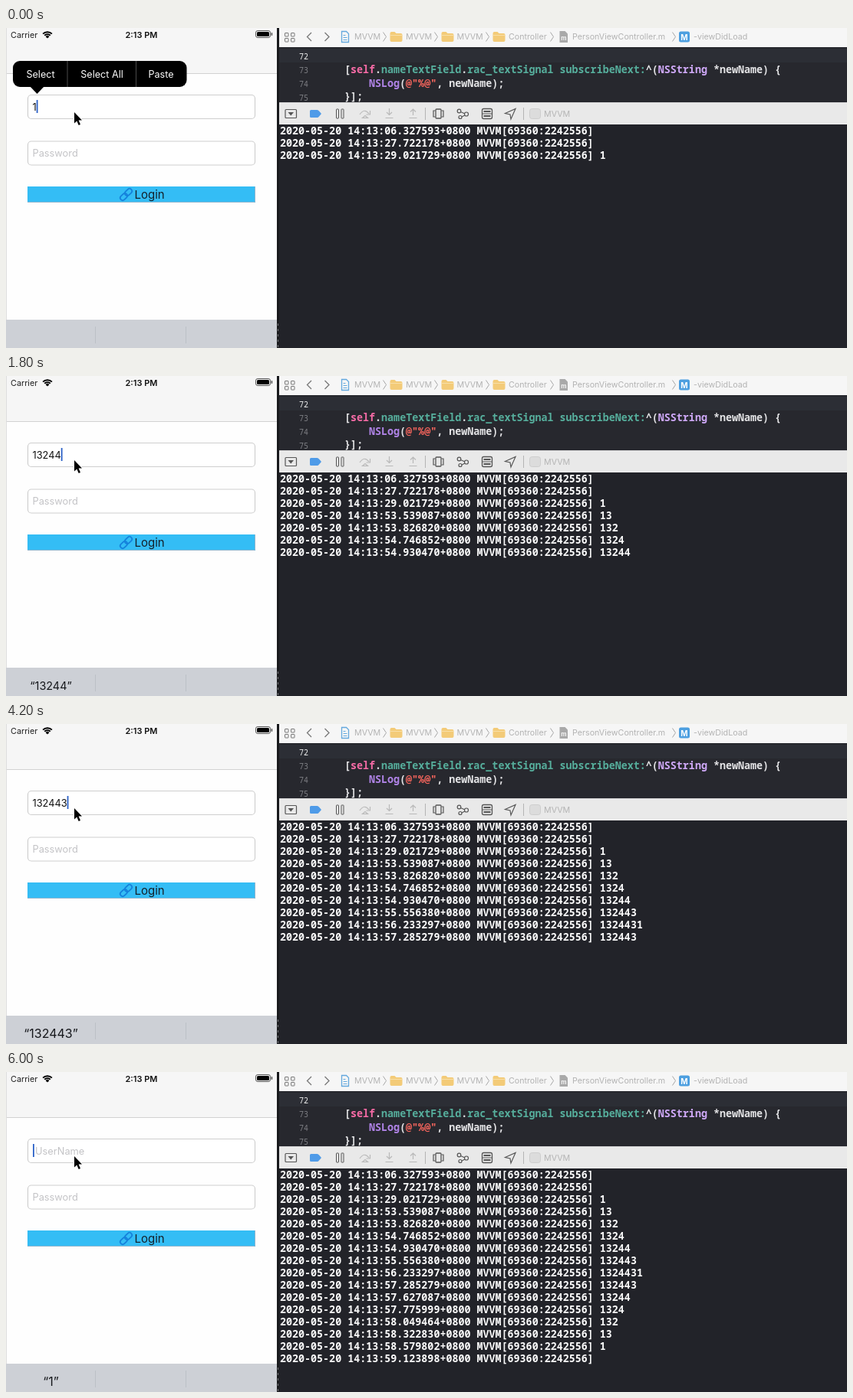
Animation, 1096 px wide and 418 px high, one loop 6200 ms. Source, as an HTML page with a canvas:

```html
<!DOCTYPE html>
<html lang="en">
<head>
<meta charset="utf-8">
<title>Login field logging</title>
<style>
html, body { margin: 0; width: 100%; height: 100%; overflow: hidden; background: #222329; }
canvas { display: block; }
</style>
</head>
<body>
<canvas id="stage" width="1096" height="418"></canvas>
<script>
const ctx = document.getElementById('stage').getContext('2d');
const LOOP = 6200, STEP = 200, START = 53190;
const UI = 'Inter, "Open Sans", sans-serif';
const MONO = '"Noto Sans Mono", "DejaVu Sans Mono", monospace';
const CODE = '13.37px ' + MONO;

// seconds and logged value
const log = `06.327593
27.722178
29.021729 1
53.539087 13
53.826820 132
54.746852 1324
54.930470 13244
55.556380 132443
56.233297 1324431
57.285279 132443
57.627087 13244
57.775999 1324
58.049464 132
58.322830 13
58.579802 1
59.123898`.split('\n').map(row => {
  const [sec, value = ''] = row.split(' ');
  return { sec, value, at: sec * 1000 - START };
});

function rect(x, y, w, h, color) {
  ctx.fillStyle = color;
  ctx.fillRect(x, y, w, h);
}

function round(x, y, w, h, r, fill, stroke, width = 1) {
  ctx.beginPath();
  ctx.roundRect(x, y, w, h, r);
  if (fill) { ctx.fillStyle = fill; ctx.fill(); }
  if (stroke) { ctx.strokeStyle = stroke; ctx.lineWidth = width; ctx.stroke(); }
}

function text(str, x, y, font, color, align = 'left') {
  ctx.font = font;
  ctx.textAlign = align;
  ctx.fillStyle = color;
  ctx.fillText(str, x, y);
  return ctx.measureText(str).width;
}

const ui = (str, x, y, size, color, align, weight = 400) =>
  text(str, x, y, `${weight} ${size}px ${UI}`, color, align);

function line(d, color, width = 1) {
  ctx.strokeStyle = color;
  ctx.lineWidth = width;
  ctx.stroke(new Path2D(d));
}

function shape(d, color) {
  ctx.fillStyle = color;
  ctx.fill(new Path2D(d));
}

function ring(x, y, r, color, width = 1) {
  ctx.beginPath();
  ctx.arc(x, y, r, 0, Math.PI * 2);
  ctx.strokeStyle = color;
  ctx.lineWidth = width;
  ctx.stroke();
}

function statusBar() {
  ui('Carrier', 6, 13, 10.8, '#222');
  ctx.lineCap = 'butt';
  for (const r of [3, 6, 9]) {
    ctx.beginPath();
    ctx.arc(54, 13.5, r - 0.7, -Math.PI * 0.75, -Math.PI * 0.25);
    ctx.strokeStyle = '#000';
    ctx.lineWidth = 2;
    ctx.stroke();
  }
  shape('M54 13.5 L52 11.4 Q54 9.8 56 11.4 Z', '#000');
  ui('2:13 PM', 176.5, 13, 11, '#111', 'center', 600);
  round(325.5, 3.5, 19, 9, 2.6, null, '#555');
  round(327, 5, 16, 6, 1.5, '#000');
  round(345.6, 6, 1.6, 4, 0.8, '#555');
}

function linkIcon() {
  ctx.save();
  ctx.translate(156.5, 217.5);
  ctx.rotate(-Math.PI / 4);
  round(-9.5, -3.2, 10.5, 6.4, 3.2, null, '#1582dc', 1.8);
  round(-1, -3.2, 10.5, 6.4, 3.2, null, '#1582dc', 1.8);
  ctx.restore();
}

function phone() {
  rect(0, 0, 353, 418, '#fefefe');
  rect(0, 0, 353, 59, '#f6f6f6');
  rect(0, 59, 353, 1, '#d2d2d2');
  rect(0, 0, 1, 381, '#dedede');
  statusBar();
  for (const y of [87.5, 148]) round(28.5, y, 296, 31, 4.5, '#fff', '#cfcfcf', 1.2);
  ui('Password', 34.5, 167.5, 12.8, '#c3c3c6');
  rect(28, 207, 297, 21, '#34bdf5');
  line('M28 227.5 H324.5 V207', '#8fb6cf');
  linkIcon();
  ui('Login', 167.5, 223, 15, '#14202a');
  rect(0, 381, 353, 37, '#cdd0d6');
  for (const x of [116, 234]) rect(x, 390, 1, 22, '#bcc0c6');
}

function caretAlpha(age) {
  const p = age % 1000;
  if (p < 500) return 1;
  if (p < 600) return (600 - p) / 100;
  return p < 850 ? 0 : (p - 850) / 150;
}

function nameField(entry, age) {
  let x = 36;
  if (entry.value) x = 35.5 + ui(entry.value, 34.5, 107.5, 12.8, '#111');
  else ui('UserName', 38, 107.5, 12.8, '#c3c3c6');
  ctx.globalAlpha = caretAlpha(age);
  rect(x - 1, 94, 1.8, 17, '#2c62c8');
  ctx.globalAlpha = 1;
}

function suggestion(i, t) {
  while (t - log[i].at < 12 || !log[i].value) i--;
  if (i < 3) return;
  const { value, at } = log[i];
  const fresh = t - at < 250;
  const grows = value.length > log[i - 1].value.length;
  const size = fresh && grows ? 14.4 : 16;
  const gap = t - at < 50 && !grows ? ' ' : '';
  ui(`“${value}${gap}”`, 58.5, 410, size, '#16181c', 'center');
}

function menu() {
  round(9, 43, 226.5, 34, 9, '#000');
  shape('M31 76 H50 L40.5 86 Z', '#000');
  for (const x of [79.5, 169]) rect(x, 43, 1, 34, '#4a4a4a');
  ui('Select', 45, 65, 12.6, '#fff', 'center');
  ui('Select All', 125, 65, 12.6, '#fff', 'center');
  ui('Paste', 202, 65, 12.6, '#fff', 'center');
}

function pointer() {
  const d = 'M89 110 V124.5 L92.3 121.5 L94.7 127 L97 126 L94.6 120.6 H99 Z';
  line(d, '#fff', 2);
  shape(d, '#000');
}

function folder(x) {
  shape(`M${x} 7 q0 -2 2 -2 h4 l2 2 h6 q2 0 2 2 v7 q0 2 -2 2 h-12 q-2 0 -2 -2 Z`, '#f3cb78');
  rect(x, 9, 16, 1, '#f8dfa8');
}

function pathBar() {
  rect(356, 0, 740, 25, '#f6f6f6');
  for (const [x, y] of [[363, 6], [371, 6], [363, 13], [371, 13]])
    round(x + 0.5, y + 0.5, 4.5, 4.5, 0.5, null, '#777');
  line('M398 6 l-5.5 5.5 l5.5 5.5 M415.5 6 l5.5 5.5 l-5.5 5.5', '#777', 1.3);
  line('M437.5 4.5 h6 l3 3 v11 h-9 Z', '#63a8dd', 1.3);
  line('M439.5 15.5 h5 M439.5 12.5 h5 M439.5 9.5 h3', '#63a8dd');
  for (const x of [500.5, 567.5, 634.5]) folder(x);
  shape('M721.5 4 h7 l3.5 3.5 v11.5 h-10.5 Z', '#a9a9a9');
  ui('m', 726.8, 16, 8, '#f6f6f6', 'center', 700);
  round(877, 4.5, 14, 14, 2.5, '#4d9fe0');
  ui('M', 884, 15.5, 10, '#fff', 'center', 700);
  const labels = [['MVVM', 454], ['MVVM', 521], ['MVVM', 587.5], ['Controller', 655],
    ['PersonViewController.m', 738], ['-viewDidLoad', 896]];
  for (const [str, x] of labels) ui(str, x, 15, 10.7, '#b3b3b3');
  for (const x of [491.5, 558.5, 625.5, 709.5, 868.5])
    line(`M${x} 5.5 l4 6 l-4 6`, '#a6a6a6');
}

function codeLine(x, y, parts) {
  for (const [str, color] of parts) x += text(str, x, y, '600 ' + CODE, color);
}

function editor() {
  const plain = '#e4e4e6', teal = '#56ae9c', violet = '#b184e8', lilac = '#cfa9f8';
  rect(356, 25, 740, 72, '#27282e');
  rect(356, 27, 740, 18, '#2c2e35');
  for (let n = 72; n < 76; n++)
    text(n, 394, 40.5 + (n - 72) * 18, '10px ' + MONO, n === 72 ? '#ededed' : '#7d7e83', 'right');
  codeLine(441, 58.5, [['[', plain], ['self', '#f76ba6'], ['.', plain],
    ['nameTextField', teal], ['.', plain], ['rac_textSignal subscribeNext:', teal],
    ['^(', plain], ['NSString', lilac], [' *newName) {', plain]]);
  codeLine(473, 76.5, [['NSLog', violet], ['(', plain], ['@"%@"', '#f2645c'],
    [', newName);', plain]]);
  codeLine(441, 94, [['}];', plain]]);
}

function toolbar() {
  const dark = '#555', pale = '#b9b9b9';
  rect(356, 97, 740, 29, '#e9e9e9');
  rect(356, 97, 740, 1, '#d6d6d6');
  round(364, 106.5, 14.5, 11, 1, null, dark, 1.2);
  shape('M367.5 110 h7.5 l-3.75 4.5 Z', dark);
  shape('M397.5 107 h8 q1.5 0 2.5 1.5 l3 3.5 l-3 3.5 q-1 1.5 -2.5 1.5 h-8 q-1.5 0 -1.5 -1.5 v-7 q0 -1.5 1.5 -1.5 Z', '#4f9be8');
  round(430.5, 106, 3, 12, 0.5, null, dark);
  round(437, 106, 3, 12, 0.5, null, dark);
  line('M461 113 q6 -9 12 -1 M474.5 108 v5 h-5 M464.5 117.5 l3.5 -3 l3.5 3 Z', pale, 1.2);
  line('M499.5 105 v8 M496 110 l3.5 3.5 l3.5 -3.5 M494.5 117.5 h10', pale, 1.2);
  line('M530.5 114 v-8 M527 109.5 l3.5 -3.5 l3.5 3.5 M525.5 117.5 h10', pale, 1.2);
  for (const x of [546, 674]) rect(x, 104, 1, 16, '#b4b4b4');
  round(560, 106, 7, 12, 1, null, dark, 1.3);
  line('M559.5 108 h-2.5 v8 h2.5 M567.5 108 h2.5 v8 h-2.5', dark, 1.2);
  ring(590.5, 108.5, 2.3, dark, 1.2);
  ring(600, 112.5, 2.5, dark, 1.2);
  ring(592, 116.5, 2, dark, 1.2);
  line('M592.5 109.5 l5 2.2 M594 116 l4 -2', dark, 1.2);
  round(620.5, 105.5, 13, 13, 2, null, dark, 1.3);
  line('M622.5 109 h9 M622.5 115 h9', dark, 2);
  line('M620.5 112 h13', dark);
  line('M650.5 111.5 L664 105.5 L658 119 L657 113 Z', dark, 1.2);
  round(682.5, 105.5, 14, 13, 3, '#dcdcdc', '#cdcdcd');
  ui('MVVM', 701, 116, 10.7, '#b4b4b4');
}

function consoleLog(last) {
  rect(356, 126, 740, 292, '#222329');
  for (let i = 0; i <= last; i++)
    text(`2020-05-20 14:13:${log[i].sec}+0800 MVVM[69360:2242556] ${log[i].value}`,
      357, 138.7 + i * 16, 'bold ' + CODE, '#fafafa');
}

function divider() {
  rect(353, 0, 3, 418, '#191a1d');
  for (let y = 386; y < 416; y += 7) rect(354, y, 1, 3, '#77797d');
}

function draw(now) {
  const t = Math.floor((now % LOOP) / STEP) * STEP;
  let last = log.length - 1;
  while (log[last].at > t) last--;
  phone();
  nameField(log[last], t - log[last].at);
  suggestion(last, t);
  if (last < 3) menu();
  pointer();
  pathBar();
  editor();
  toolbar();
  consoleLog(last);
  divider();
}

const origin = performance.now();
function tick() {
  draw(performance.now() - origin);
  requestAnimationFrame(tick);
}
tick();
</script>
</body>
</html>
```
